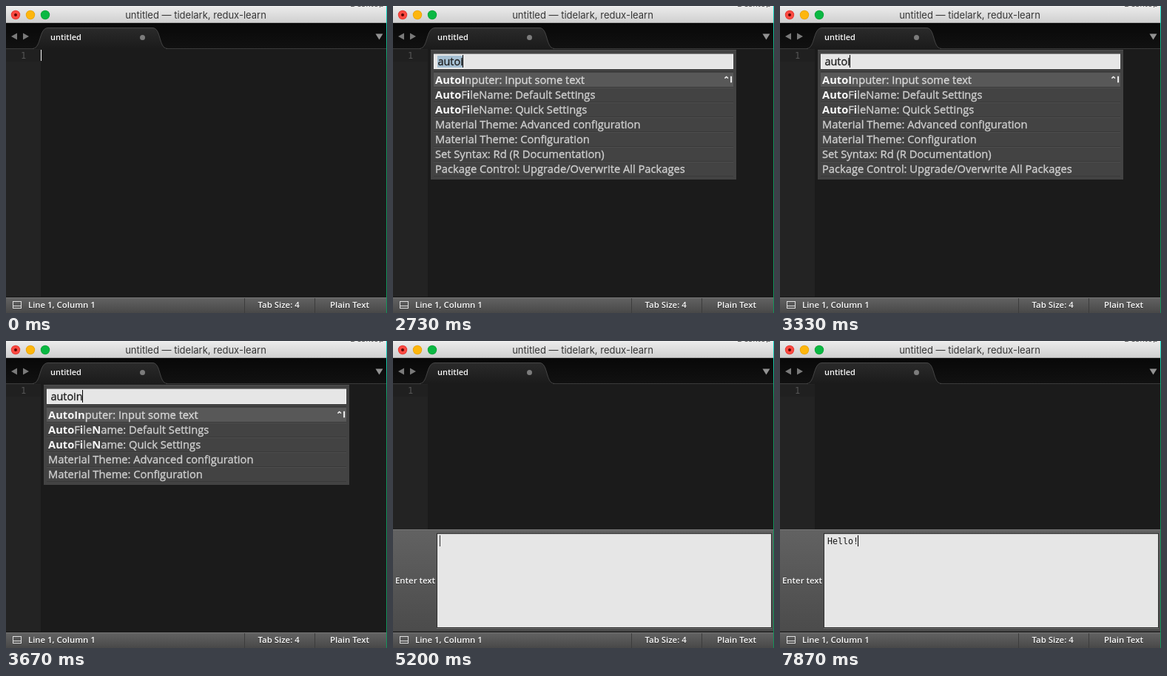
An HTML page with a canvas that plays this animation: 515 px wide and 414 px high, repeating every 8 s.

```html
<!DOCTYPE html>
<html lang="en">
<head>
<meta charset="utf-8">
<title>Editor command palette</title>
<style>
html, body { margin: 0; width: 100%; height: 100%; overflow: hidden; background: #1b1b1b; }
canvas { display: block; }
</style>
</head>
<body>
<canvas id="stage" width="515" height="414"></canvas>
<script>
const W = 515, H = 414, LOOP = 8000, ROW = 20;
const ctx = document.getElementById('stage').getContext('2d');
const UI = '"Open Sans", "Noto Sans", "DejaVu Sans", sans-serif';
const MONO = '"DejaVu Sans Mono", monospace';

// "|" marks where the fuzzy match starts; after "#" comes the shortcut
const INPUTER = 'AutoInputer: Input some text#⌃I';
const DEFAULTS = 'AutoFileName: Default Settings';
const QUICK = 'AutoFileName: Quick Settings';
const ABOUT = 'About';
const ADVANCED = 'Material Theme: |Advanced configuration';
const CONFIG = 'Material Theme: Configuration';
const SYNTAX = 'Set Syntax: Rd (R Documentation)';
const UPGRADE = 'Package Control: Upgrade/Overwrite All Packages';
const TAGS = 'Code Folding: Fold Tag |Attributes#⌘K, ⌘T';
const BABEL = 'Preferences: Babel – Def|ault';

const LONG = [QUICK, INPUTER, ABOUT,
  'Package Control: Upgrade Package',
  'Package Control: List Unmanaged Packages',
  'Convert Case: Upper Case#⌘K, ⌘U',
  'Preferences: Babel – User',
  'Emmet: Encode\\Decode Image to data:URL#⌃⇧D',
  ADVANCED, TAGS,
  'Preferences: Package Control Settings – User',
  BABEL, UPGRADE];
const SHORT = [INPUTER, DEFAULTS, QUICK, ADVANCED, CONFIG];
const MIDDLE = [...SHORT, SYNTAX, UPGRADE];
const LISTS = {
  a: LONG, au: LONG,
  aut: [INPUTER, DEFAULTS, QUICK, ABOUT, TAGS, ADVANCED, CONFIG, BABEL, SYNTAX, UPGRADE],
  auto: MIDDLE, autoi: MIDDLE, autoin: SHORT
};

// start time, view, typed text, text is selected
const STEPS = [
  [-190, 'edit', ''],
  [1600, 'palette', 'autoi', true],
  [2870, 'palette', 'a'],
  [3000, 'palette', 'au'],
  [3130, 'palette', 'aut'],
  [3270, 'palette', 'auto'],
  [3330, 'palette', 'autoi'],
  [3600, 'palette', 'autoin'],
  [4870, 'panel', ''],
  [6730, 'panel', 'H'],
  [6900, 'panel', 'He'],
  [7070, 'panel', 'Hel'],
  [7200, 'panel', 'Hell'],
  [7400, 'panel', 'Hello'],
  [7600, 'panel', 'Hello!'],
  [7740, 'panel', 'Hello!']
];

function rect(x, y, w, h, fill) {
  ctx.fillStyle = fill;
  ctx.fillRect(x, y, w, h);
}

function fade(y0, y1, ...colors) {
  const g = ctx.createLinearGradient(0, y0, 0, y1);
  colors.forEach((c, i) => g.addColorStop(i / (colors.length - 1), c));
  return g;
}

function disc(x, y, r, fill) {
  ctx.fillStyle = fill;
  ctx.beginPath();
  ctx.arc(x, y, r, 0, Math.PI * 2);
  ctx.fill();
}

function poly(fill, ...pts) {
  ctx.fillStyle = fill;
  ctx.beginPath();
  for (let i = 0; i < pts.length; i += 2) ctx.lineTo(pts[i], pts[i + 1]);
  ctx.fill();
}

// Draws text, thickened by an optional outline, and returns its width
function text(s, x, y, font, fill, align = 'left', outline = 0) {
  ctx.font = font;
  ctx.fillStyle = fill;
  ctx.textAlign = align;
  ctx.fillText(s, x, y);
  if (outline) {
    ctx.strokeStyle = fill;
    ctx.lineWidth = outline;
    ctx.strokeText(s, x, y);
  }
  return ctx.measureText(s).width;
}

function label(s, x, y) {
  const font = `600 11.4px ${UI}`;
  text(s, x, y + 1, font, 'rgba(0,0,0,.4)');
  text(s, x, y, font, '#fafafa');
}

// Caret stays solid after a key, then fades out and in
function caretAlpha(age) {
  const smooth = (a, b, v) => {
    const k = Math.min(1, Math.max(0, (v - a) / (b - a)));
    return k * k * (3 - 2 * k);
  };
  const p = age < 260 ? 0 : (age - 260) % 1080;
  return 1 - smooth(0, 240, p) + smooth(670, 860, p);
}

function caret(x, y, h, color, alpha) {
  ctx.globalAlpha = alpha;
  rect(x, y, 1, h, color);
  ctx.globalAlpha = 1;
}

function light(x, edge, fill) {
  disc(x, 12, 6.2, edge);
  disc(x, 12, 5.4, fill);
}

function titleBar() {
  rect(0, 0, W, 23, fade(0, 22, '#ececec', '#d0d0d0'));
  rect(0, 0, W, 1, '#f4f4f4');
  rect(0, 22, W, 1, '#a9a9a9');
  ctx.save();
  ctx.beginPath();
  ctx.rect(464, 0, 50, 2);
  ctx.clip();
  text('Desktop', 465, 1, `12px ${UI}`, '#555');
  ctx.restore();
  light(13, '#e2362f', '#fc4a42');
  disc(13, 12, 2, '#5c0703');
  light(33, '#e9a30a', '#fdb60d');
  light(53, '#0aa337', '#0ab843');
  text('untitled — tidelark, redux-learn', 256.5, 17, '13px Inter, Roboto, sans-serif', '#363636', 'center');
}

function tabBar() {
  rect(0, 23, W, 35, fade(23, 57, '#080808', '#111'));
  rect(0, 57, W, 1, '#3a3a3a');
  ctx.beginPath();
  ctx.moveTo(36, 57.5);
  ctx.bezierCurveTo(48, 57, 44, 29.5, 57, 29.5);
  ctx.lineTo(198, 29.5);
  ctx.bezierCurveTo(210, 29.5, 206, 57, 218, 57.5);
  ctx.fillStyle = fade(29, 58, '#2a2a2a', '#1b1b1b');
  ctx.fill();
  ctx.strokeStyle = '#464646';
  ctx.lineWidth = 1;
  ctx.stroke();
  rect(38, 57, 178, 1, '#1b1b1b');
  text('untitled', 60, 46, `600 11px ${UI}`, '#f8f8f8');
  disc(184.5, 42.5, 3.5, '#7c7c7c');
  poly('#7a7a7a', 7, 41, 15, 36.5, 15, 45.5);
  poly('#7a7a7a', 31, 41, 23, 36.5, 23, 45.5);
  poly('#929292', 499.5, 37.5, 509.5, 37.5, 504.5, 45.5);
}

function statusBar() {
  rect(0, 392, W, 1, '#181818');
  rect(0, 393, W, 21, fade(393, 414, '#636363', '#484848'));
  rect(0, 393, W, 1, '#767676');
  for (const x of [322, 417]) rect(x, 394, 1, 20, '#3c3c3c');
  ctx.strokeStyle = '#dedede';
  ctx.lineWidth = 1;
  ctx.strokeRect(9.5, 398.5, 11, 9);
  rect(10, 404, 10, 1, '#dedede');
  label('Line 1, Column 1', 30, 407);
  label('Tab Size: 4', 340.5, 407);
  label('Plain Text', 438, 407);
}

function editor() {
  rect(0, 58, W, 334, '#1b1b1b');
  rect(0, 58, 47, 334, '#232323');
  rect(0, 59, 47, 16, '#202020');
  text('1', 20, 71, `12px ${MONO}`, '#555');
}

// Indices of the matched letters, or none when the query does not fit
function matches(s, from, query) {
  const hits = new Set(), low = s.toLowerCase();
  let at = from;
  for (const ch of query) {
    const i = low.indexOf(ch, at);
    if (i < 0) return new Set();
    hits.add(i);
    at = i + 1;
  }
  return hits;
}

function paletteRow(item, y, query, selected) {
  const [marked, keys] = item.split('#');
  const s = marked.replace('|', '');
  const hits = matches(s, Math.max(0, marked.indexOf('|')), query);
  rect(55, y, 405, 1, '#4d4d4d');
  if (selected) rect(55, y, 405, ROW - 1, '#585858');
  rect(55, y + 19, 405, 1, '#393939');

  let x = 57;
  for (let i = 0; i < s.length;) {
    const bold = hits.has(i);
    let end = i + 1;
    while (end < s.length && hits.has(end) === bold) end++;
    const part = s.slice(i, end);
    x += bold
      ? text(part, x, y + 15, `700 14.7px ${UI}`, '#f8f8f8')
      : text(part, x, y + 15, `14.7px ${UI}`, selected ? '#d8d8d8' : '#cfcfcf', 'left', 0.35);
    i = end;
  }
  if (keys) text(keys, 459, y + 13, `700 11.2px ${UI}`, '#f8f8f8', 'right', 0.3);
}

function palette(query, selected, alpha) {
  const list = LISTS[query], height = 35 + list.length * ROW;
  rect(51, 59, 413, height, '#434343');
  rect(51, 59, 413, 1, '#505050');
  rect(55, 64, 405, 21, '#f4f4f4');
  rect(56, 65, 403, 19, '#e6e6e6');
  rect(55, 64, 405, 1, '#8a8a8a');
  rect(55, 88, 405, 1, '#383838');

  const font = `14.4px ${UI}`;
  ctx.font = font;
  const w = ctx.measureText(query).width;
  if (selected) rect(60, 67, w + 0.5, 16, '#a6c0d3');
  text(query, 60.5, 80, font, '#1e1e1e', 'left', 0.3);
  caret(Math.floor(60 + w), 66, 17, '#000', alpha);

  const active = list.indexOf(INPUTER);
  list.forEach((item, i) => paletteRow(item, 90 + i * ROW, query, i === active));
  if (list === LONG) {
    ctx.fillStyle = 'rgba(20,20,20,.82)';
    ctx.beginPath();
    ctx.roundRect(450.5, 99, 8, 83.5, 4);
    ctx.fill();
  }
}

function inputPanel(typed, alpha) {
  rect(0, 254, W, 138, fade(254, 392, '#626262', '#4b4b4b'));
  rect(0, 254, W, 1, '#777');
  rect(0, 391, W, 1, '#3c3c3c');
  rect(59, 259, 453, 128, '#303030');
  rect(60, 260, 451, 126, '#e6e6e6');
  rect(60, 260, 451, 1, '#bdbdbd');
  rect(59, 387, 453, 1, '#6c6c6c');
  label('Enter text', 3, 327);
  text(typed, 64, 274, `11.63px ${MONO}`, '#1c1c1c');
  caret(63 + typed.length * 7, 262, 15, '#000', alpha);
}

function draw(t) {
  const [start, view, typed, selected] = STEPS.findLast(s => s[0] <= t);
  const alpha = caretAlpha(t - start);
  editor();
  titleBar();
  tabBar();
  if (view === 'edit') caret(47, 59, 15, '#f8f8f8', alpha);
  if (view === 'palette') palette(typed, selected, alpha);
  if (view === 'panel') inputPanel(typed, alpha);
  statusBar();
  rect(514, 0, 1, H, fade(0, 80, '#19dfd0', '#12935a'));
}

const origin = performance.now();
function tick() {
  draw((performance.now() - origin) % LOOP);
  requestAnimationFrame(tick);
}
tick();
</script>
</body>
</html>
```
